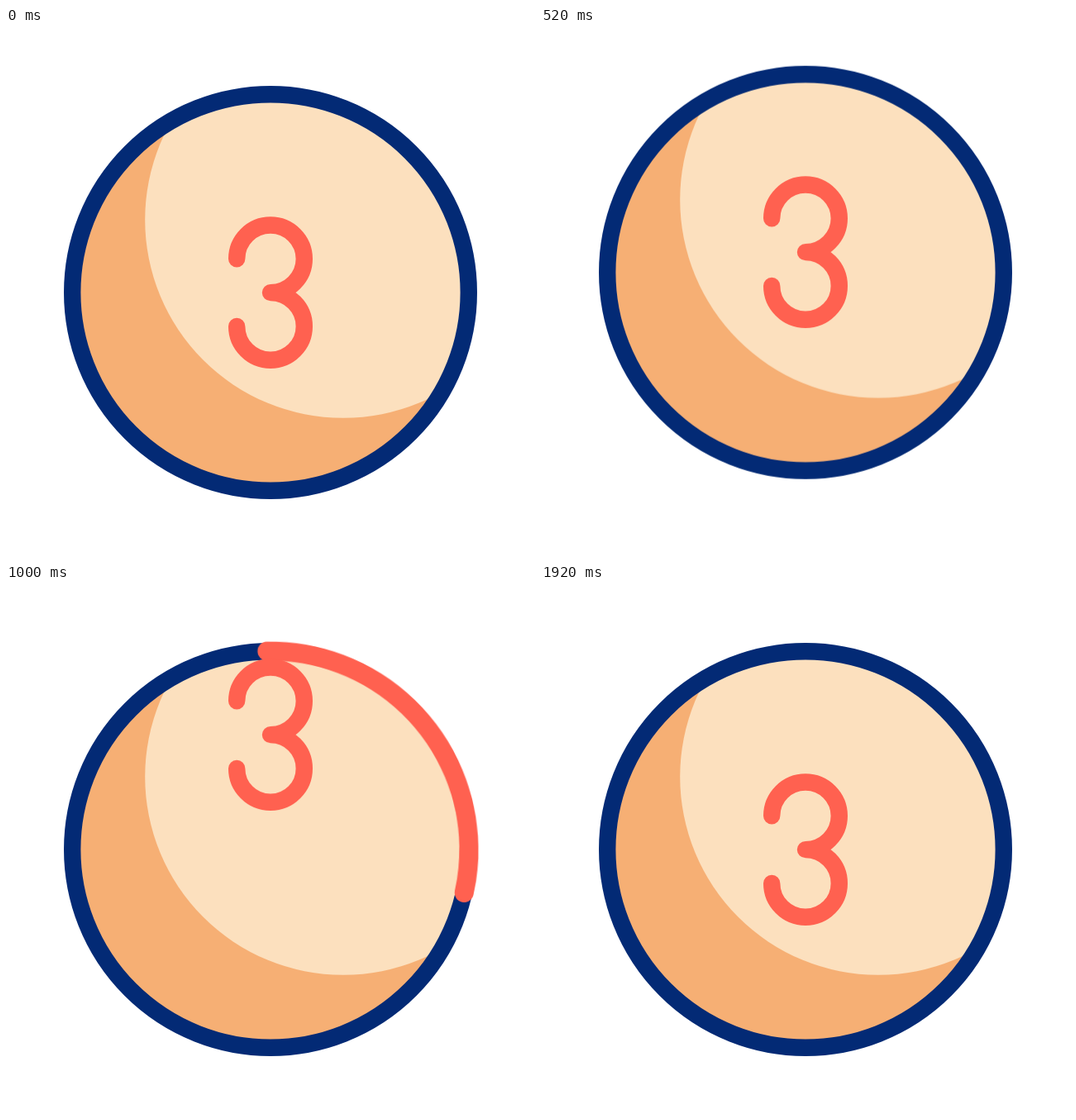
Write an HTML page without scripts that moves like this. It is 640 by 640 pixels and loops after 2 s.

```html
<!DOCTYPE html>
<html lang="en">
<head>
<meta charset="utf-8">
<title>Bouncing ball</title>
<style>
  @property --head { syntax: "<number>"; inherits: false; initial-value: 0; }
  @property --tail { syntax: "<number>"; inherits: false; initial-value: 0; }

  html, body { margin: 0; width: 100%; height: 100%; overflow: hidden; background: #fff; }
  svg { display: block; width: 100%; height: 100%; }

  .ball, .digit, .sweep {
    animation-duration: 2s;
    animation-iteration-count: infinite;
    animation-timing-function: cubic-bezier(.333, 0, .667, 1);
  }
  .ball { animation-name: ball; }
  .digit { animation-name: digit; }

  .line { fill: none; stroke-linecap: round; stroke-linejoin: round; }
  .rim { stroke: #032a75; stroke-width: 20.4; }
  .red { stroke: #ff6150; stroke-width: 20.4; }
  .sweep {
    stroke-width: 23;
    stroke-dasharray: calc((var(--head) - var(--tail)) * 1px) 999px;
    stroke-dashoffset: calc(var(--tail) * -1px);
    animation-name: head, tail, show;
  }

  @keyframes ball {
    0%, 6.5% { transform: translateY(0); }
    18% { transform: translateY(33.3px); }
    28% { transform: translateY(-30.6px); }
    38%, 100% { transform: translateY(0); }
  }
  @keyframes digit {
    0%, 6.5% { transform: translateY(0); }
    18% { transform: translateY(51.2px); }
    28% { transform: translateY(-60px); }
    38% { transform: translateY(54.5px); }
    50% { transform: translateY(-139px); }
    62%, 100% { transform: translateY(0); }
  }
  @keyframes head {
    0%, 38% { --head: 0; }
    72%, 100% { --head: 360; }
  }
  @keyframes tail {
    0%, 50% { --tail: 0; }
    96%, 100% { --tail: 360; }
  }
  /* hides the round-cap dot while the arc has no length */
  @keyframes show {
    0% { opacity: 0; animation-timing-function: step-end; }
    38.2% { opacity: 1; animation-timing-function: step-end; }
    95.8%, 100% { opacity: 0; }
  }
</style>
</head>
<body>
<svg viewBox="0 0 640 640">
  <clipPath id="disc"><circle cx="320" cy="320" r="240"/></clipPath>
  <g class="ball">
    <g clip-path="url(#disc)">
      <circle cx="320" cy="320" r="240" fill="#f6af74"/>
      <circle cx="408" cy="232" r="239.8" fill="#fce0be"/>
    </g>
    <circle class="line rim" cx="320" cy="320" r="239.8"/>
  </g>
  <circle class="line red sweep" cx="320" cy="320" r="240" pathLength="360" transform="rotate(-91 320 320)"/>
  <path class="line red digit" d="M279.2 279.3a40.8 40.8 0 1 1 40.8 40.8a40.8 40.8 0 1 1-40.8 40.8"/>
</svg>
</body>
</html>
```
